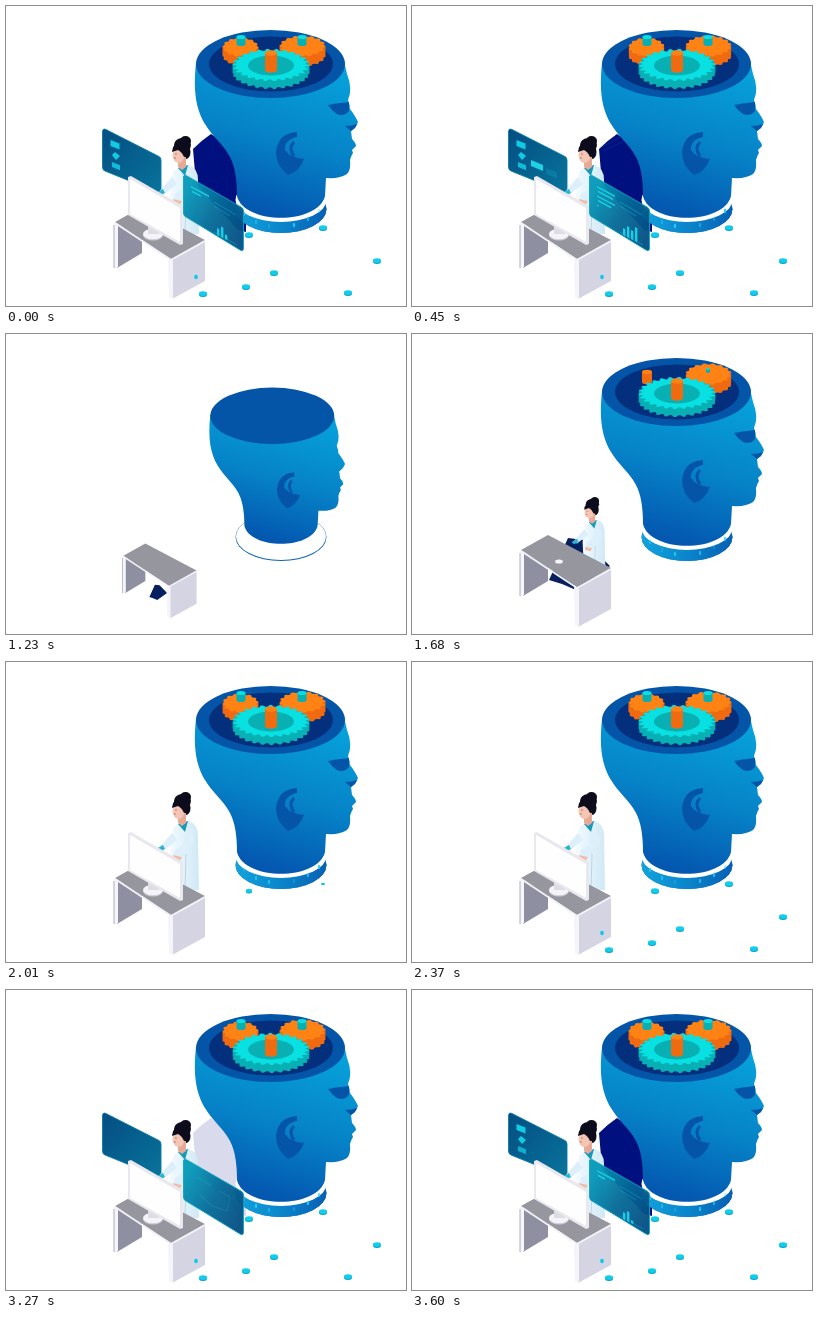
An HTML page with a canvas that plays this animation: 400x300 px, repeating every 3630 ms.

```html
<!DOCTYPE html>
<html>
<head>
<meta charset="utf-8">
<style>
html, body { margin: 0; width: 100%; height: 100%; overflow: hidden; background: #fff; }
canvas { display: block; width: 400px; height: 300px; }
</style>
</head>
<body>
<canvas id="stage"></canvas>
<script>
const LOOP = 3630, START = 1080;
const canvas = document.getElementById('stage');
const ctx = canvas.getContext('2d');
const dpr = window.devicePixelRatio || 1;
canvas.width = 400 * dpr;
canvas.height = 300 * dpr;

const TEAL = '#08e0e2', TEAL_SIDE = '#08b0b4', ORANGE = '#ff8214', ORANGE_SIDE = '#f06a10';
const CYAN = '#08c8ec', NAVY = '#00107f', RIM = '#0455a8', HOLLOW = '#042f7c', SHADE = '#0455a8';

const clamp = v => Math.max(0, Math.min(1, v));
const ramp = (t, a, b) => clamp((t - a) / (b - a));
const easeOut = (t, a, b) => 1 - Math.pow(1 - ramp(t, a, b), 3);

function fill(d, color) {
  ctx.fillStyle = color;
  ctx.fill(new Path2D(d));
}
function stroke(d, color, width) {
  ctx.strokeStyle = color;
  ctx.lineWidth = width;
  ctx.stroke(new Path2D(d));
}
function oval(x, y, rx, ry, color) {
  ctx.beginPath();
  ctx.ellipse(x, y, rx, ry, 0, 0, 7);
  ctx.fillStyle = color;
  ctx.fill();
}
function gradient(x0, y0, x1, y1, ...colors) {
  const g = ctx.createLinearGradient(x0, y0, x1, y1);
  colors.forEach((c, i) => g.addColorStop(i / (colors.length - 1), c));
  return g;
}
// Scales a part about a pivot.
function pop(t, a, b, x, y, draw) {
  const scale = easeOut(t, a, b);
  if (!scale) return;
  ctx.save();
  ctx.translate(x, y);
  ctx.scale(scale, scale);
  ctx.translate(-x, -y);
  draw();
  ctx.restore();
}
function fade(alpha, draw) {
  if (alpha <= 0) return;
  ctx.save();
  ctx.globalAlpha *= alpha;
  draw();
  ctx.restore();
}

function peg(x, top, r, h, color, side) {
  ctx.fillStyle = side;
  ctx.fillRect(x - r, top, 2 * r, h);
  oval(x, top + h, r, r * 0.45, side);
  oval(x, top, r, r * 0.45, color);
}
function gear(x, y, rx, ry, h, teeth, color, side, turn) {
  const outline = dy => {
    ctx.beginPath();
    for (let i = 0; i < teeth * 4; i++) {
      const a = (i + turn * 4) / (teeth * 4) * 2 * Math.PI;
      const k = i % 4 < 2 ? 1 : 0.9;
      ctx.lineTo(x + rx * k * Math.cos(a), y + dy + ry * k * Math.sin(a));
    }
    ctx.closePath();
  };
  ctx.fillStyle = side;
  for (let dy = h; dy > 0; dy--) { outline(dy); ctx.fill(); }
  outline(0);
  ctx.fillStyle = color;
  ctx.fill();
}

function base(t) {
  oval(275, 203, 45.5, 24, '#0b65b5');
  oval(275, 202.5, 45, 23.5, '#fff');
  fade(ramp(t, 1350, 1470), () => {
    oval(275, 203, 45.5, 24, gradient(230, 0, 320, 0, '#12a2dc', '#0a86cc', '#0860b4'));
    oval(275, 194, 45.5, 22, '#fff');
  });
}
function baseLights(t) {
  const on = ramp(t, 1500, 1650);
  [[238, 208], [250, 216], [263, 220], [288, 219], [302, 213], [313, 205]].forEach(([x, y], i) => {
    const glow = 0.65 + 0.35 * Math.sin(t / 180 + i * 2);
    fade(on * glow, () => oval(x, y, 1.2, 2.2, '#28c8f0'));
  });
}

function head(t) {
  fill('M190 57C187 85 190 103 199 118C206 130 217 138 224 151Q231 164 231 190' +
    'C238 219 312 219 319 190L320 172Q334 173 341 168Q345 164 344 154Q345 150 347 147L346 144' +
    'L350 140Q350 137 346 133L345 125Q350 122 352 116Q350 111 344 103Q344 99 342 94Q347 83 341 68L338 55Z',
    gradient(300, 60, 260, 205, '#06a0da', '#0684c8', '#0458b0'));
  oval(264.5, 58, 74.5, 34, RIM);
  fade(ramp(t, 1300, 1430), () => {
    oval(265, 58, 62, 27.5, HOLLOW);
    fill('M322 99Q333 97 343 96L343 105Q338 111 331 108Q325 104 322 99Z', SHADE);
    fill('M339 120Q346 120 351 118L349 122L345 125Z', SHADE);
  });
  fill('M291 126Q272 127 270 146Q270 160 282 169Q293 166 298 153Q284 152 279 144Q278 134 291 131Z', SHADE);
  stroke('M288 136Q282 142 288 150', SHADE, 3);
}

function gears(t) {
  const turn = t / LOOP * 3;
  pop(t, 1560, 1680, 235, 48, () => peg(235, 38, 5, 10, ORANGE, ORANGE_SIDE));
  pop(t, 1710, 1860, 235, 47, () => gear(234.5, 41, 18, 9.5, 9, 14, ORANGE, ORANGE_SIDE, turn));
  pop(t, 1500, 1650, 297, 46, () => gear(296.5, 40, 23, 10.5, 10, 16, ORANGE, ORANGE_SIDE, turn));
  pop(t, 1860, 1980, 235, 38, () => peg(235, 31, 4.5, 7, TEAL, TEAL_SIDE));
  pop(t, 1650, 1830, 296, 38, () => peg(296, 31, 4.5, 7, TEAL, TEAL_SIDE));
  pop(t, 1380, 1530, 265, 64, () => {
    gear(265, 59, 38.5, 16, 8, 26, TEAL, TEAL_SIDE, -turn);
    oval(265, 59.5, 23, 10, TEAL_SIDE);
  });
  pop(t, 1470, 1590, 265, 66, () => peg(265, 47, 6, 17, ORANGE, ORANGE_SIDE));
}

function desk() {
  fill('M110 218L136 231V247L111 262Z', '#8f8fa2');
  fill('M108 216L112 218V261L108 263Z', '#f6f6fa');
  stroke('M108 219V262', '#8f8fa2', 0.7);
  fill('M165 253L199 234V275L166 293Z', '#d4d4e2');
  fill('M162 251L167 254V293L163 291Z', '#f4f4f9');
  fill('M109 216L136 201L199 234L165 253Z', '#96969f');
  stroke('M109 217L165 254L199 235', '#f2f2f7', 1.8);
}
function monitor() {
  fill('M142 216H153V228H142Z', '#dcdce4');
  fill('M122 171L125 170L177 200V238L174 239L122 209Z', '#e8e8ee');
  fill('M124 173L174 202V236L124 208Z', '#fefefe');
}

function woman() {
  fill('M167 166Q174 159 183 159Q192 162 192 174L193 228H166L164 187Z',
    gradient(164, 0, 194, 0, '#f2faff', '#cfe8f5'));
  fill('M172 162L182 159L179 170Z', '#159bb9');
  oval(176.5, 139, 8.5, 7, '#0c0c1d');
  oval(179.5, 135, 5.5, 5, '#0c0c1d');
  oval(180, 146, 4.5, 7, '#0c0c1d');
  fill('M172 151H180V161L176 164L172 161Z', '#e6aa96');
  oval(172.5, 149.5, 6, 7.5, '#f4c5b2');
  fill('M166 146Q166 138 176 136L181 148L178 151Q176 146 172 144Z', '#0c0c1d');
  fill('M181 166Q188 169 188 180L178 195L168 193L169 188L177 183Z', '#dceffa');
  fill('M166 171L171 178L157 189L152 187Z', '#dceffa');
  fill('M157 183L159 187L153 190L150 187Z', '#2bb6cf');
  fill('M167 193L176 195L174 199L167 197Z', '#f0bda8');
  stroke('M168 152L170 152M169 148L171 148', '#945c55', 0.7);
  stroke('M180 192L179 228', '#afcfdf', 0.8);
}
function legs(t) {
  fade(1 - ramp(t, 1700, 1830), () => pop(t, 1180, 1650, 146, 270, () =>
    fill('M156 204L172 206L198 232L164 256L150 250L137 246Z', '#06205f')));
}

function dots(t) {
  const spots = [[243, 229], [317, 222], [371, 255], [342, 287], [268, 267], [240, 281], [197, 288]];
  spots.forEach(([x, y], i) => pop(t, 1950 + i * 35, 2100 + i * 35, x, y, () => {
    oval(x, y + 0.6, 4, 2.5, '#079fc9');
    oval(x, y - 0.4, 4, 2.4, '#10cdec');
  }));
  pop(t, 2100, 2300, 190, 270, () => oval(190, 271, 1.8, 2.2, CYAN));
}

function beam() {
  fill('M187 143Q196 134 205 128L240 150V226L232 224L190 178Z', NAVY);
}
function beamLines(t) {
  fade(ramp(t, 3960, 4260) * 0.6, () => stroke('M190 141L208 131M191 145L212 135', '#1678c0', 0.8));
}

// Blocks lean along the panel's perspective.
function slab(x, y, w, h, slope, color) {
  fill(`M${x} ${y}l${w} ${w * slope}v${h}l${-w} ${-w * slope}Z`, color);
}
function leftScreen(t) {
  const edge = 'M96.5 126Q96.5 122 100 123.5L152 150Q155 151 155 154V183Q155 187 151 186L99 165Q96.5 164 96.5 161Z';
  fill(edge, gradient(97, 125, 156, 186, '#044e82', '#08749c'));
  stroke(edge, '#087ca8', 0.9);
  const show = (a, draw) => fade(ramp(t, a, a + 180), draw);
  show(3330, () => slab(104.5, 134, 9, 6, 0.4, '#10cbe4'));
  show(3390, () => fill('M109 146L114 150L110 154L106 149Z', '#10cbe4'));
  show(3450, () => slab(106, 156, 8, 5, 0.4, '#10bcd8'));
  show(3840, () => slab(119, 154, 12, 6, 0.42, '#18d4e6'));
  show(4050, () => slab(134, 162, 11, 6, 0.42, '#18d4e6'));
  show(4140, () => stroke('M109 141V146M114 150L119 156M131 162L134 164M114 160L121 163', '#159ec5', 0.8));
}
function rightScreen(t) {
  const edge = 'M177.5 171Q177.5 168 181 170L235 201Q237.5 202 237.5 205V242Q237.5 246 234 244L180 211Q177.5 210 177.5 207Z';
  fade(0.95, () => fill(edge, gradient(178, 190, 238, 225, '#0698b8', '#046a98', '#034f84')));
  stroke(edge, '#0aa4c4', 0.9);
  const sketch = ramp(t, 2800, 2970) * (1 - ramp(t, 3120, 3330));
  fade(sketch * 0.7, () =>
    stroke('M191 187L205 196M194 205L206 216L221 221L224 207L213 201', '#25b5d0', 1.2));
  for (let i = 0; i < 5; i++) {
    const grow = ramp(t, 3300 + i * 190, 3540 + i * 190);
    if (grow) slab(185 + i % 2, 180 + i * 4.6, (i % 2 ? 15 : 18) * grow, 1.6, 0.53, '#16d0e2');
  }
  [7, 11, 9, 14].forEach((h, i) => {
    const size = h * easeOut(t, 3300 + i * 130, 3620 + i * 130);
    if (size) slab(211 + i * 4, 229 + i * 2 - size, 2.4, size, 0.5, '#16d0e8');
  });
  fade(ramp(t, 3420, 3660) * 0.6, () =>
    stroke('M208 196L230 209M208 200L224 210M208 226L231 239', '#25b5d0', 0.8));
}

function scene(t) {
  fade(ramp(t, 3240, 3450), beam);
  beamLines(t);
  pop(t, 1080, 1200, 275, 203, () => base(t));
  pop(t, 1110, 1380, 275, 200, () => head(t));
  baseLights(t);
  gears(t);

  fade(ramp(t, 3030, 3210), () => leftScreen(t));
  legs(t);
  pop(t, 1500, 1950, 195, 285, woman);
  pop(t, 1110, 1392, 154, 247, desk);
  pop(t, 1650, 1860, 147, 227, () => {
    oval(147, 229, 10, 5.5, '#c9c9d5');
    oval(147, 228, 10, 5.2, '#f4f4f8');
  });
  pop(t, 1710, 1980, 147, 228, monitor);
  dots(t);
  fade(ramp(t, 2700, 2880), () => rightScreen(t));
}

function frame(now) {
  const t = now % LOOP;
  ctx.setTransform(dpr, 0, 0, dpr, 0, 0);
  ctx.fillStyle = '#fff';
  ctx.fillRect(0, 0, 400, 300);
  // The build-up runs past the loop point and clears at START.
  scene(t < START ? t + LOOP : t);
}

const began = performance.now();
function tick() {
  frame(performance.now() - began);
  requestAnimationFrame(tick);
}
tick();
</script>
</body>
</html>
```
